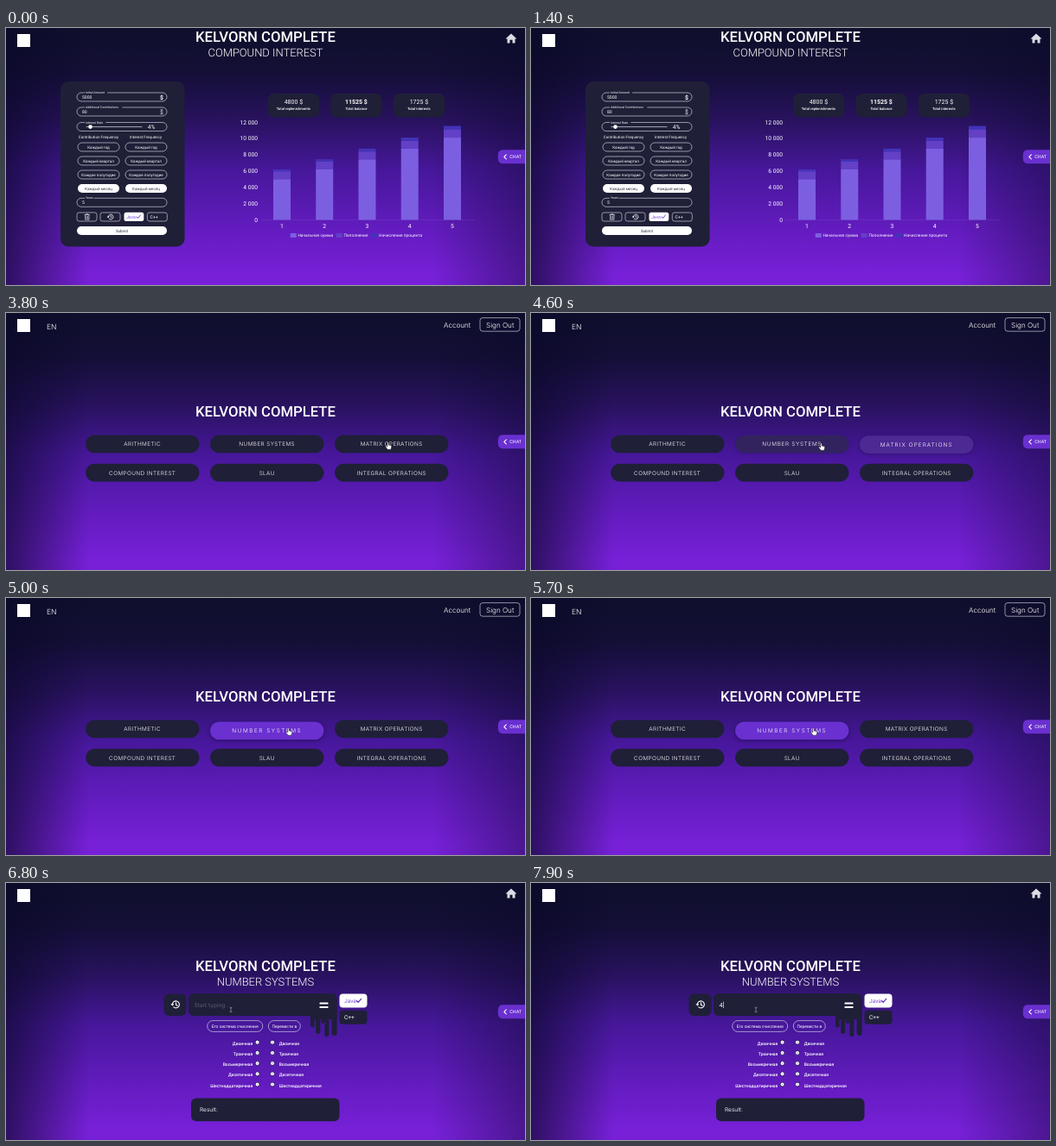
These frames come from a looping animation (600x298 px, 8 s). An HTML page:

```html
<!DOCTYPE html>
<html lang="en">
<meta charset="utf-8">
<title>Calculator tour</title>
<style>
  html, body { margin: 0; width: 100%; height: 100%; overflow: hidden; }
  body {
    background:
      linear-gradient(90deg, #0a0828aa, #0a082800 16%, #0a082800 82%, #0a082866),
      linear-gradient(#0f0f2c, #130f36 17%, #29125f 36%, #46179a 55%, #5f1bba 75%, #7720d8 96%);
  }
  svg { display: block; width: 100%; height: 100%; text-rendering: geometricPrecision; }
  text { white-space: pre; }
</style>
<body>
<script>
const DARK = '#1f1f38', WHITE = '#fff', VIOLET = '#6a30d0';
const ROBOTO = 'Roboto, sans-serif', INTER = 'Inter, sans-serif';
const LOOP = 8000, HOME_AT = 3300, NUMBERS_AT = 5800;

// Text centred vertically on y.
const text = (s, x, y, size, { fill = WHITE, anchor = 'start', weight = 400, font = ROBOTO, attrs = '' } = {}) =>
  `<text x="${x}" y="${y + size * .36}" font-size="${size}" font-family="${font}" font-weight="${weight}" fill="${fill}" text-anchor="${anchor}" ${attrs}>${s}</text>`;
const mid = (s, x, y, size, opts) => text(s, x, y, size, { anchor: 'middle', ...opts });
const box = (x, y, w, h, r, fill = DARK, attrs = '') =>
  `<rect x="${x}" y="${y}" width="${w}" height="${h}" rx="${r}" fill="${fill}" ${attrs}/>`;
const line = (d, stroke = WHITE, width = 1) =>
  `<path d="${d}" fill="none" stroke="${stroke}" stroke-width="${width}" stroke-linecap="round" stroke-linejoin="round"/>`;
const outline = (x, y, w, h, r) => box(x, y, w, h, r, 'none', 'stroke="#e6e6f0" stroke-width=".6"');
const group = (id, body) => `<g id="${id}">${body}</g>`;

const title = y => mid('KELVORN COMPLETE', 300, y, 16.7, { weight: 500 });
const subtitle = (s, y) => mid(s, 300, y, 12.95, { weight: 300 });
const check = (x, y, k) => line(`M${x} ${y}l${1.6 * k} ${1.7 * k}l${3 * k} ${-3.6 * k}`, '#5b2bc0', k);
const history = (x, y, k) => `<g transform="translate(${x} ${y}) scale(${k})">` +
  line('M-3.6 0A4 4 0 1 1 -2.2 3.1M.5 -2V.4L2.2 1.4', WHITE, 1.1) +
  `<path d="M-5.6 -.6H-1.6L-3.6 1.8Z" fill="#fff"/></g>`;
const house = '<path d="M584 6.6L577.5 12.4H579.5V17.6H582.5V13.8H585.5V17.6H588.5V12.4H590.5Z" fill="#dcdce4"/>';

function field(y, label, value) {
  const w = label.length * 1.72;
  return outline(82, y, 104, 10, 5) + box(91, y - 1.5, w + 2, 3, 0) +
    text(label, 92, y - .2, 3.55) + text(value, 88, y + 5.2, 5.1);
}

function form() {
  let s = box(63, 62, 143.5, 191.5, 9) +
    field(75, 'Initial Amount', '5000') + field(92, 'Additional Contributions', '80') +
    field(109.5, 'Interest Rate', '') + field(197.3, 'Years', '5') +
    mid('$', 180, 80.2, 6.8, { weight: 700 }) + mid('$', 180, 97.3, 6.8, { fill: '#b4b4c4' }) +
    line('M93 114.6H157', '#c9c9d8', .8) + '<circle cx="97.5" cy="114.6" r="2.3" fill="#fff"/>' +
    mid('4%', 168, 114.6, 6.6) +
    mid('Contribution Frequency', 107, 126.3, 4.5) + mid('Interest Frequency', 161.5, 126.3, 4.5);
  ['Каждый год', 'Каждый квартал', 'Каждое полугодие', 'Каждый месяц'].forEach((name, i) => {
    const y = 133 + 16 * i, on = i == 3;
    for (const x of [83, 138])
      s += (on ? box(x, y, 48, 10, 5, WHITE) : outline(x, y, 48, 10, 5)) +
        mid(name, x + 24, y + 5, 4.5, { fill: on ? '#33334d' : WHITE });
  });
  for (const x of [82, 109, 163.3]) s += outline(x, 214, 23, 10, 2.5);
  return s + box(136.5, 213.8, 22.8, 10.2, 2.5, WHITE) +
    line('M91 216.6H96.6M92.8 216.6V215.7H94.8V216.6M91.6 217.2V222.2H96V217.2M93 218.4V221M94.6 218.4V221', WHITE, .6) +
    history(120.8, 219, .72) +
    text('Java', 139, 219, 5.2, { fill: '#7b4fd8' }) + check(151, 218.9, .95) + text('C++', 166.5, 219, 5.2) +
    box(82, 230, 104, 10, 5, WHITE) + mid('Submit', 134, 235, 4.5, { fill: '#24243c' });
}

function chart() {
  const base = 222.5, unit = 9.45 / 1000, colors = ['#7c5fe0', '#6340c6', '#4433b8'];
  let s = '';
  [['4800 $', 'Total replenishments'], ['11525 $', 'Total balance'], ['1725 $', 'Total interests']].forEach(([sum, name], i) => {
    const x = 302.7 + 72.5 * i;
    s += box(x, 76, 59.5, 27.5, 7) + mid(sum, x + 29.7, 85.8, 7, { weight: i == 1 ? 700 : 400 }) +
      mid(name, x + 29.7, 93.3, 4.2, { weight: 500 });
  });
  for (let k = 0; k <= 12; k += 2)
    s += text(k ? k + ' 000' : '0', 291, base - k * 1000 * unit, 6.7, { anchor: 'end' });
  s += line(`M295 ${base}H541`, '#ffffff22', .5);
  let balance = 5000;
  for (let i = 0; i < 5; i++) {
    const x = 309 + 49.25 * i, parts = [balance, 960, balance * .046];
    let y = base;
    parts.forEach((p, j) => s += box(x, y -= p * unit, 20, p * unit, 0, colors[j]));
    balance += 960 + parts[2];
    s += mid(i + 1, x + 10, 230, 6.8);
  }
  ['Начальная сумма', 'Пополнение', 'Начисление процента'].forEach((name, i) => {
    const x = [328.7, 381.7, 422.3][i];
    s += box(x, 238, 7, 5, 0, colors[i]) + text(name, x + 8.7, 240.6, 4.85);
  });
  return s;
}

const menu = ['ARITHMETIC', 'NUMBER SYSTEMS', 'MATRIX OPERATIONS', 'COMPOUND INTEREST', 'SLAU', 'INTEGRAL OPERATIONS'];
function home() {
  const light = { font: INTER, weight: 300 };
  return text('EN', 47, 15.6, 8.5, light) + text('Account', 506, 14, 8.1, light) +
    outline(548, 5.6, 46, 15.6, 3) + mid('Sign Out', 571.2, 13.6, 8.1, light) + title(114.3) +
    menu.map((name, i) => {
      const x = 92 + 144 * (i % 3), y = i < 3 ? 141.5 : 174.8;
      return `<g class="item">${box(x, y, 131.5, 20.7, 10.3)}${mid(name, x + 65.7, y + 10.4, 6.4, { ...light, attrs: 'letter-spacing=".4"' })}</g>`;
    }).join('');
}

function numbers() {
  let s = title(96.3) + subtitle('NUMBER SYSTEMS', 114.7) +
    box(182.5, 128.5, 26, 25.5, 6) + history(196, 140.8, 1) + box(211, 128, 171.7, 26, 6) +
    box(352, 146, 30.7, 12, 3) +
    box(362.5, 138.5, 10, 2, .6, WHITE) + box(362.5, 143, 10, 2, .6, WHITE) +
    box(385.5, 128.5, 32, 16, 4, WHITE) + text('Java', 391, 136.7, 6.6, { fill: '#7b4fd8' }) + check(405.3, 136.5, 1.15) +
    box(385.5, 147.8, 32, 16, 4) + text('C++', 391, 155.8, 6.6);
  // Drips below the input.
  for (const [x, w, end] of [[352, 4.6, 167.5], [358.2, 5, 175], [364.2, 4, 163], [368.4, 5, 178], [376.6, 6, 177]])
    s += box(x, 150, w, end - 150, w / 2);
  s += outline(232.7, 159.6, 64, 12.8, 6.4) + mid('Его система счисления', 264.7, 166, 4.95) +
    outline(303.3, 159.6, 37, 12.8, 6.4) + mid('Перевести в', 321.8, 166, 4.95);
  ['Двоичная', 'Троичная', 'Восьмеричная', 'Десятичная', 'Шестнадцатиричная'].forEach((name, i) => {
    const y = 186 + 12.2 * i, bold = { weight: 500 };
    s += text(name, 285.3, y, 5, { ...bold, anchor: 'end' }) + text(name, 315.7, y, 5, bold);
    for (const x of [290.6, 308])
      s += `<circle cx="${x}" cy="${y - 1.3}" r="2.5" fill="#fff" stroke="#2b1460" stroke-width=".9"/><circle cx="${x}" cy="${y - 1.3}" r=".8" fill="#b9a4e4"/>`;
  });
  return s + box(214, 249.5, 171.5, 26.7, 6) + text('Result:', 224, 263, 6.5, { font: INTER, fill: '#e4e4ee' }) +
    text('Start typing..', 217.5, 141.2, 6.5, { font: INTER, fill: '#5d5d78', attrs: 'id="hint"' }) +
    text('4', 217.5, 141.2, 6.8, { font: INTER, attrs: 'id="typed"' }) +
    box(0, 137.6, .6, 7.4, 0, WHITE, 'id="caret"');
}

const cursors =
  group('arrow', '<path d="M0 0V7.4L1.8 5.8L3 8.3L4.1 7.8L3 5.4H5.2Z" fill="#fff" stroke="#111" stroke-width=".4"/>') +
  group('hand', '<path d="M-1.2 -3.4C-1.2 -4.6 .3 -4.6 .3 -3.4V-1L3 -.4Q3.9 0 3.7 1.2L3 4.2H-1L-3.2 .9C-3.4 .1 -2.4 -.3 -1.8 .4L-1.2 1Z" fill="#fff" stroke="#111" stroke-width=".5"/>') +
  group('beam', line('M-1 -2.8Q0 -2.8 0 -2V2Q0 2.8 -1 2.8M1 -2.8Q0 -2.8 0 -2M0 2Q0 2.8 1 2.8', '#c4c4d0', .5));

document.body.innerHTML = `<svg viewBox="0 0 600 298" preserveAspectRatio="none">
  ${box(13, 7, 15, 15, 0, WHITE)}
  ${group('house', house)}
  ${group('interest', title(10.3) + subtitle('COMPOUND INTEREST', 28.8) + form() + chart())}
  ${group('home', home())}
  ${group('numbers', numbers())}
  <path d="M600 141.3H575Q568.8 141.3 568.8 147V151.5Q568.8 157.3 575 157.3H600Z" fill="${VIOLET}"/>
  ${line('M578.3 146.8L575.8 149.3L578.3 151.8', WHITE, 1.1)}${text('CHAT', 582.3, 149.4, 5.4)}
  ${group('cursor', cursors)}</svg>`;

const $ = id => document.getElementById(id);
const show = (id, on) => $(id).style.display = on ? '' : 'none';
const clamp = v => Math.max(0, Math.min(1, v));
const smooth = v => (v = clamp(v), v * v * (3 - 2 * v));
const items = [...document.querySelectorAll('.item')];

// Pointer stops: time, x, y.
const path = [[1900, 180, 97], [2700, 584, 20], [3350, 584, 20], [3780, 442, 154], [4330, 442, 154], [4600, 336, 155],
  [4800, 327, 155], [5790, 327, 155], [5900, 321, 152], [6100, 321, 152], [6600, 260, 147]];
function pointer(t) {
  const i = path.findIndex(p => p[0] > t);
  if (i <= 0) return (i ? path.at(-1) : path[0]).slice(1);
  const [a, b] = [path[i - 1], path[i]], k = (t - a[0]) / (b[0] - a[0]);
  return [a[1] + (b[1] - a[1]) * k, a[2] + (b[2] - a[2]) * k];
}

const hoverSpan = { 1: [4470, Infinity], 2: [3800, 4430] };
const mix = (a, b, k) => a.map((v, i) => Math.round(v + (b[i] - v) * k));
function drawHover(t) {
  for (const i in hoverSpan) {
    const [start, end] = hoverSpan[i];
    const h = smooth((t - start) / 400) * (1 - smooth((t - end) / 400));
    const [rect, label] = items[i].children;
    rect.setAttribute('fill', `rgb(${mix([31, 31, 56], [106, 48, 208], h)})`);
    label.setAttribute('letter-spacing', .4 + 1.15 * h);
    items[i].setAttribute('transform', `translate(0 ${2 * h * h})`);
    items[i].style.filter = h ? `drop-shadow(0 1px 2px rgba(15,8,50,${.6 * h}))` : '';
  }
}

function draw(t) {
  const scene = t < HOME_AT ? 'interest' : t < NUMBERS_AT ? 'home' : 'numbers';
  for (const id of ['interest', 'home', 'numbers']) show(id, id == scene);
  show('house', scene != 'home');
  drawHover(t);

  const typed = t >= 7500;
  show('hint', !typed);
  show('typed', typed);
  show('caret', t >= 6900 && (t - 6900) % 1000 < 500 || typed);
  $('caret').setAttribute('x', typed ? 222.4 : 217.2);

  const [x, y] = pointer(t);
  const over = scene == 'interest' ? x > 576 : scene == 'home' && y > 141 && x < 512;
  const kind = t < 1900 || scene == 'numbers' ? 'beam' : over ? 'hand' : 'arrow';
  for (const id of ['arrow', 'hand', 'beam']) show(id, id == kind);
  $('cursor').setAttribute('transform', `translate(${x} ${y})`);
}

const began = performance.now();
(function tick() {
  draw((performance.now() - began) % LOOP);
  requestAnimationFrame(tick);
})();
</script>
</body>
</html>
```
